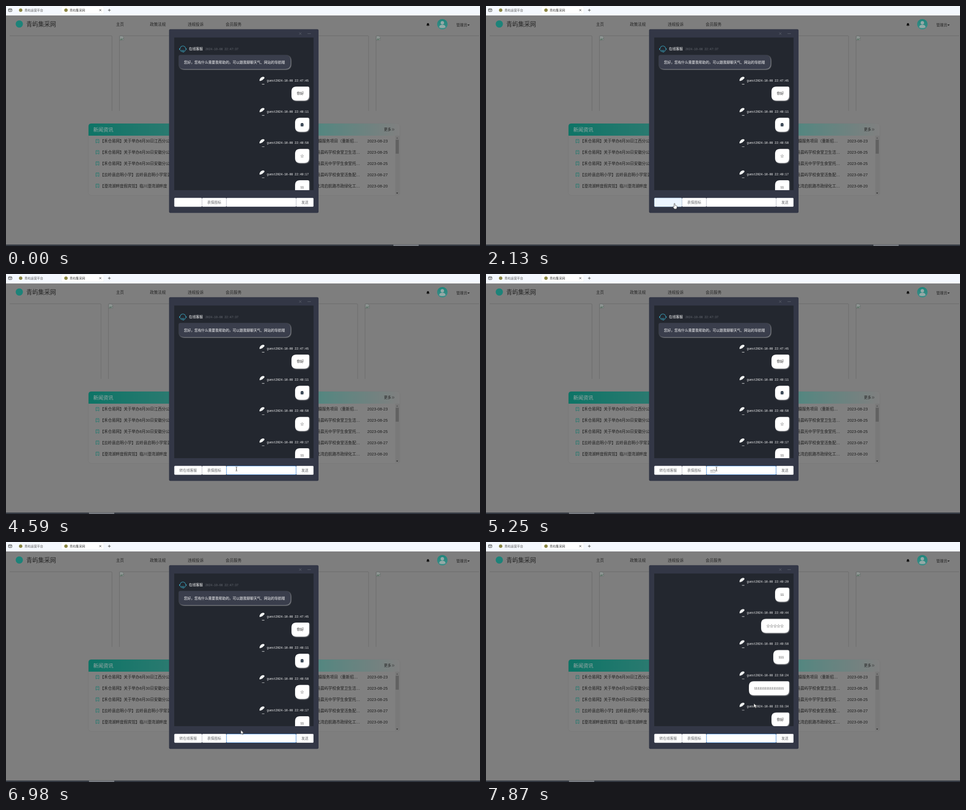
These frames come from a looping animation (1051x533 px, 8000 ms). An HTML page:

```html
<!DOCTYPE html>
<html lang="zh-CN">
<head>
<meta charset="utf-8">
<title>在线客服</title>
<style>
  html, body { margin: 0; width: 100%; height: 100%; overflow: hidden; background: #7e7e7e; }
  svg { display: block; width: 1051px; height: 533px; }
  text { font-family: 'Liberation Sans', 'Noto Sans CJK SC', 'Noto Sans CJK', sans-serif; white-space: pre; }
  .mono { font-family: 'Liberation Mono', 'Noto Sans CJK SC', 'Noto Sans CJK', monospace; }
  .end { text-anchor: end; }
  .mid { text-anchor: middle; }
  .glow { filter: drop-shadow(1.3px 1.3px .9px rgba(255, 255, 255, .6)); }
</style>
</head>
<body>
<svg id="stage" viewBox="0 0 1051 533" xmlns="http://www.w3.org/2000/svg">
  <defs>
    <linearGradient id="banner"><stop stop-color="#0d7466"/><stop offset=".26" stop-color="#2a7a70"/><stop offset=".74" stop-color="#548680"/><stop offset="1" stop-color="#808080"/></linearGradient>
    <linearGradient id="avatar" x2="0" y2="1"><stop stop-color="#1f857c"/><stop offset="1" stop-color="#3d8d87"/></linearGradient>
    <clipPath id="slideClip"><rect x="8" y="65" width="1041" height="168"/></clipPath>
    <clipPath id="chatClip"><rect x="373" y="70" width="309" height="339"/></clipPath>
    <g id="broken">
      <path d="M.5 .5h6l3 3v6.500h-9z" fill="#8d9492" stroke="#626665" stroke-width=".7"/>
      <path d="M1 9.500l3-4 2 2 3-3v2l-3 3z" fill="#5f7468"/>
    </g>
  </defs>

  <rect width="1051" height="533" fill="#7e7e7e"/>

  <g id="tabs">
    <rect width="1051" height="21" fill="#f4f8fe"/>
    <rect x="122.500" y="1" width="94.500" height="16.500" rx="3" fill="#fff" stroke="#e3e7ec" stroke-width=".6"/>
    <g fill="none" stroke="#333" stroke-width=".9">
      <rect x="5.500" y="6" width="7.500" height="6.500" rx="1.300"/>
      <path d="M5.500 8h7.500M8 10h2.500"/>
      <path d="M207 7.200l4.200 4.200m0-4.200l-4.200 4.200M226 9.300h6.200m-3.100-3.100v6.200"/>
    </g>
    <circle cx="32.500" cy="9.300" r="3.800" fill="#8b8745"/>
    <circle cx="133" cy="9.300" r="3.800" fill="#8b8745"/>
  </g>

  <g id="header">
    <circle cx="29.500" cy="40" r="8" fill="#1d8379"/>
    <path d="M932 43.500q1.200-1 1.200-3.200a2.400 2.400 0 0 1 4.800 0q0 2.200 1.200 3.200zM934.500 44.200h2.200q-1 1.500-2.200 0z" fill="#111"/>
    <circle cx="967.500" cy="40.500" r="11.500" fill="url(#avatar)"/>
    <circle cx="967.500" cy="37.200" r="3.800" fill="#93a9a7"/>
    <path d="M960.500 47.500q0-6 7-6t7 6q-7 3-14 0z" fill="#93a9a7"/>
    <path d="M1023 41h5.200l-2.600 3z" fill="#222"/>
  </g>

  <g clip-path="url(#slideClip)"><g id="slides"></g></g>

  <g id="news">
    <rect x="182.500" y="261" width="691" height="159.500" rx="6" fill="#808080" stroke="#767676" stroke-width=".8"/>
    <path d="M183 288v-21q0-6 6-6h678q6 0 6 6v21z" fill="url(#banner)"/>
    <path d="M856 271.800l2 2.500-2 2.500m2.700-5l2 2.500-2 2.500" fill="none" stroke="#222" stroke-width=".7"/>
    <rect x="863" y="288" width="9.500" height="131" fill="#797979"/>
    <rect x="864" y="297" width="7" height="31" fill="#626262"/>
    <path d="M865.300 294.200h4l-2-2.500z" fill="#4b4b4b"/>
    <path d="M865.300 414.500h4l-2 2.500z" fill="#222"/>
  </g>

  <rect y="529.700" width="1051" height="3.300" fill="#343941"/>
  <rect id="taskMark" y="530" width="56" height="3" fill="#767a80"/>

  <g id="dialog">
    <rect x="361.500" y="51.500" width="331.500" height="408" rx="3" fill="#333746"/>
    <path d="M650 58.800l5 5m0-5l-5 5M668.500 61.300h7.500" stroke="#666b77" stroke-width=".8"/>
    <rect x="373" y="70" width="309" height="339" fill="#23272f"/>
  </g>
  <g clip-path="url(#chatClip)"><g id="chat">
    <g fill="none" stroke="#3aa3bd" stroke-width="1.100">
      <path d="M386 95a6.200 6.200 0 0 1 12.400 0M386.500 97.500a5.800 5 0 0 0 11.400 0"/>
      <path d="M385 94v3.500m14.300-3.500v3.500" stroke-width="1.800"/>
      <path d="M389 98q3 2.500 6 0M392 102h3"/>
    </g>
  </g></g>
  <g id="controls"></g>

  <g id="pointer">
    <path id="arrow" d="M0 0v9l2.100-1.900 1.500 3.300 1.500-.7-1.500-3.200h2.800z" fill="#fff" stroke="#222" stroke-width=".6"/>
    <path id="hand" d="M-1 1q0-1.200 1-1.200t1 1.200v3.300l3.500.8q1.200.4 1.200 1.600l-.7 3.800-.8 1.700h-4.700l-3-4.300q-.5-1.500 1-1.200l1.500 1.200z" fill="#fff" stroke="#222" stroke-width=".7"/>
    <path id="beam" d="M-2-4.500q2 0 2 1v7q0 1-2 1M2-4.500q-2 0-2 1m0 7q0 1 2 1M-1 .8h2" fill="none" stroke="#222" stroke-width=".8"/>
  </g>
</svg>

<script>
const LOOP = 8000;
const $ = id => document.getElementById(id);

function add(parent, tag, attrs) {
  const node = document.createElementNS('http://www.w3.org/2000/svg', tag);
  for (const key in attrs) node.setAttribute(key, attrs[key]);
  return parent.appendChild(node);
}

// cy is the visual middle of the line
function label(parent, x, cy, str, size, fill, cls = '') {
  const node = add(parent, 'text', { x, y: cy + size * .37, fill, 'font-size': size, class: cls });
  node.textContent = str;
  return node;
}

// rows: [ms, value, easing]; without an easing the value holds until the next row
function play(node, prop, rows) {
  const steps = [[0, rows[0][1]], ...rows, [LOOP, rows[rows.length - 1][1]]];
  node.animate(
    steps.map(([ms, value, easing = 'step-end']) => ({ offset: ms / LOOP, [prop]: value, easing })),
    { duration: LOOP, iterations: Infinity }
  );
}

function show(node, ...spans) {
  const rows = [[0, 0]];
  for (const [from, to] of spans) rows.push([from, 1], [to, 0]);
  play(node, 'opacity', rows);
}

// Page
label($('tabs'), 41, 9.5, '青屿运营平台', 6.9, '#555');
label($('tabs'), 141, 9.5, '青屿集采网', 6.9, '#444');
label($('header'), 45, 40.3, '青屿集采网', 13.2, '#262626');
['主页', '政策法规', '违规投诉', '会员服务'].forEach((name, i) =>
  label($('header'), [244, 319, 403, 487][i], 40.7, name, 8.8, '#242424'));
label($('header'), 998.5, 42, '管理员', 8.1, '#222');

const SLIDE = 569;
for (let i = 0; i < 4; i++) {
  const x = 251.5 + (i - 1) * SLIDE;
  add($('slides'), 'path', {
    d: `M${x} 240V68q0-2 2-2h548.500q2 0 2 2V240`,
    fill: 'none', stroke: '#656565', 'stroke-width': .8
  });
  add($('slides'), 'use', { href: '#broken', x, y: 66 });
}

const news = $('news');
label(news, 193.5, 274.5, '新闻资讯', 11.1, '#a0aaa8');
label(news, 838, 274.5, '更多', 8, '#222');
[
  ['【禾仓易网】关于举办8月30日江西分公', '摄服务项目（重新招…', '23', 780],
  ['【禾仓易网】关于举办8月30日安徽分公', '县晨屿学校食堂卫生洁…', '25', 785],
  ['【禾仓易网】关于举办8月30日安徽分公', '县晨光中学学生食堂托…', '25', 785],
  ['【云岭县启明小学】云岭县启明小学常温', '县晨屿学校食堂活鱼配…', '27', 785],
  ['【澄湾湖畔度假宾馆】临川澄湾湖畔度', '北湾启航路市政绿化工…', '20', 785]
].forEach(([left, right, day, edge], i) => {
  const y = 300.2 + i * 24.8;
  add(news, 'path', {
    d: `M199.500 ${y - 4}h6.500v8l-3.200-2-3.300 2zM201.500 ${y - 1.5}h2.500`,
    fill: 'none', stroke: '#12796c', 'stroke-width': .9
  });
  label(news, 208.5, y, left, 8.75, '#1c1c1c');
  label(news, edge, y, right, 8.8, '#1c1c1c', 'end');
  label(news, 801, y, '2023-08-' + day, 8.9, '#1c1c1c');
});

// Chat
const chat = $('chat');
const SIZE = 7.73, MONO = 6.45, PITCH = 69.3;
label(chat, 405.5, 95.3, '在线客服', SIZE, '#fff');
label(chat, 442, 95.5, '2024-10-08 22:47:37', MONO, '#686c74', 'mono');
add(chat, 'path', {
  d: 'M386 109H619q12 0 12 12v7q0 12-12 12H395q-12 0-12-12V112q0-3 3-3z',
  fill: '#3a3e4c', class: 'glow'
});
label(chat, 394.5, 125, '您好，您有什么需要我帮助的，可以跟我聊聊天气、网站的导航哦', SIZE, '#fff');

[
  ['22:47:45', '你好', 39], ['22:48:11', '', 31], ['22:48:58', '☆', 31],
  ['22:49:17', '11', 31], ['22:49:20', '11', 31], ['22:49:44', '☆☆☆☆☆', 62],
  ['22:49:58', '111', 35], ['22:50:24', '1'.repeat(17), 89], ['22:55:34', '你好', 39]
].forEach(([time, body, width], i) => {
  const y = 165.3 + i * PITCH, left = 672 - width, top = y + 13.7, mid = 672 - width / 2;
  add(chat, 'path', {
    d: `M562 ${y + 1}a9 9 0 0 1 8-9.300l3 1v2.500l-5 4.500-4 1.500zM567 ${y + 8}h6v.9h-5z`,
    fill: '#eef0f0'
  });
  label(chat, 671, y, 'guest2024-10-08 ' + time, MONO, '#fff', 'mono end');
  add(chat, 'path', {
    d: `M${left + 11} ${top}H669q3 0 3 3v17q0 11-11 11H${left + 11}q-11 0-11-11V${top + 11}q0-11 11-11z`,
    fill: '#fff', class: 'glow'
  });
  if (body) {
    const digits = body[0] === '1';
    label(chat, mid, top + 15.5, body, digits ? MONO : SIZE, '#222', digits ? 'mono mid' : 'mid');
  } else {
    add(chat, 'path', { d: `M${mid - 3} ${top + 12.5}h2v-1h2v1h2v6.500h-6z`, fill: '#1d2a38' });
    add(chat, 'path', { d: `M${mid - .8} ${top + 14.5}h1.600v2.500h-1.600z`, fill: '#9fb4c4' });
  }
});

// Controls
const controls = $('controls');
const PLAIN = '#606266', BLUE = '#409eff';

function button(x, width, names) {
  const box = add(controls, 'rect', {
    x: x + .25, y: 426.25, width: width - .5, height: 19.5, rx: 2,
    fill: '#fff', stroke: '#dcdfe6', 'stroke-width': .5
  });
  const texts = names.map(name => label(controls, x + width / 2, 436, name, SIZE, PLAIN, 'mid'));
  return { box, texts };
}

function highlight({ box, texts }, ...spans) {
  const fade = (base, lit) => {
    const rows = [[0, base]];
    for (const [on, off] of spans)
      rows.push([on, base, 'linear'], [on + 100, lit], [off, lit, 'linear'], [off + 100, base]);
    return rows;
  };
  play(box, 'fill', fade('#ffffff', '#ecf5ff'));
  play(box, 'stroke', fade('#dcdfe6', '#b3d8ff'));
  texts.forEach(text => play(text, 'fill', fade(PLAIN, BLUE)));
}

const agent = button(373, 61.7, ['转人工客服', '转在线客服']);
const emoji = button(434.7, 54, ['表情图标']);
button(643.3, 38.7, ['发送']);
const field = add(controls, 'rect', {
  x: 489, y: 426.4, width: 154, height: 19.2, rx: 1.5, fill: '#fff', stroke: '#dcdfe6', 'stroke-width': .8
});

highlight(agent, [1850, 3500]);
highlight(emoji, [1710, 1850], [2650, 3150]);
show(agent.texts[0], [0, 2400]);
show(agent.texts[1], [2400, LOOP]);
play(field, 'stroke', [
  [0, '#dcdfe6'], [1100, '#c0c4cc'], [1700, '#dcdfe6'], [3200, '#c0c4cc'],
  [3500, '#c0c4cc', 'linear'], [3700, BLUE]
]);

const typed = [['n', 4950], ['ni', 5050], ["ni'h", 5250], ["ni'ha", 5320], ["ni'hao", 5400], ['你好', 5850]];
typed.forEach(([str, from], i) => {
  const text = label(controls, 497.3, 436, str, SIZE, PLAIN);
  const to = i < typed.length - 1 ? typed[i + 1][1] : 6400;
  show(text, [from, to]);
  const line = add(controls, 'path', { d: `M497.300 440.300h${text.getComputedTextLength()}`, stroke: PLAIN, 'stroke-width': .6 });
  show(line, [from, Math.min(to, 5920)]);
});

// Motion
const slide = [[0, 'translateX(0px)']];
for (const start of [840, 2725, 4573, 6350])
  slide.push([start, 'translateX(0px)', 'ease'], [start + 300, `translateX(${-SLIDE}px)`], [start + 300, 'translateX(0px)']);
play($('slides'), 'transform', slide);

play($('chat'), 'transform', [
  [7130, 0, 'ease-out'], [7450, -217], [7690, -217, 'ease-out'], [7860, -354.7]
].map(([ms, y, easing]) => [ms, `translateY(${y}px)`, easing]));

play($('taskMark'), 'transform', [[0, 'translateX(859px)'], [2400, 'translateX(184px)']]);

play($('pointer'), 'transform', [
  [0, 988, 522], [70, 988, 522, 'ease-in-out'], [830, 545, 335], [860, 545, 335, 'ease-in-out'],
  [1180, 520, 436], [1600, 520, 436, 'ease-in-out'], [2100, 418, 438.5],
  [2450, 418, 438.5, 'ease-in-out'], [3000, 486.5, 437], [3110, 486.5, 437, 'ease-in-out'],
  [3360, 505, 436], [4000, 505, 436, 'linear'], [4180, 511, 433],
  [6890, 511, 433, 'ease-in-out'], [7150, 549, 373], [7480, 549, 373, 'linear'],
  [7660, 556, 370], [7700, 556, 370, 'ease-out'], [7860, 594, 358.5]
].map(([ms, x, y, easing]) => [ms, `translate(${x}px, ${y}px)`, easing]));

show($('arrow'), [70, 1090], [6950, LOOP]);
show($('beam'), [1090, 1710], [3150, 6950]);
show($('hand'), [1710, 3150]);
</script>
</body>
</html>
```
